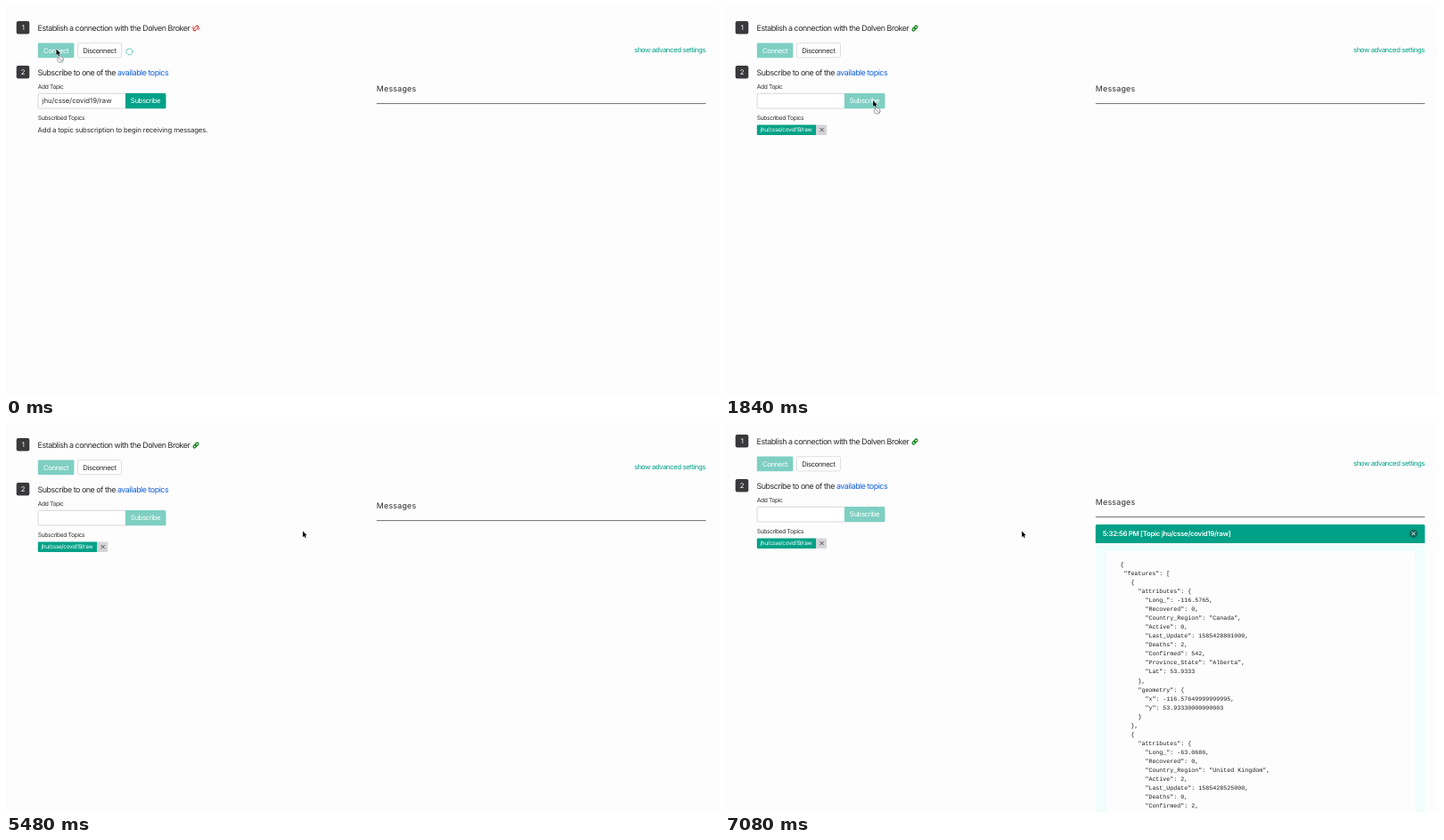
These frames come from a looping animation (800 by 437 pixels, 7120 ms). An HTML page:

```html
<!DOCTYPE html>
<html lang="en">
<head>
<meta charset="utf-8">
<title>Topic subscription demo</title>
<style>
  html, body { margin: 0; width: 100%; height: 100%; overflow: hidden; background: #fefdfe; }
  svg { display: block; width: 800px; height: 437px; }
  text { font: 7.78px Inter, sans-serif; letter-spacing: -.053em; fill: #2b2b2e; text-rendering: geometricPrecision; }
  .big { font-size: 8.89px; }
  .small { font-size: 6.67px; }
  .tag { font-size: 6.45px; }
  .mid { text-anchor: middle; }
  .white { fill: #fff; }
  .green { fill: #00a187; }
  .wide { letter-spacing: .025em; }
  .plain { letter-spacing: 0; }
  .note { letter-spacing: -.02em; }
  .head { font-weight: 600; letter-spacing: -.035em; }
  .code text { font: 6.667px "Liberation Mono", monospace; letter-spacing: 0; fill: #1c1c1f; }
  .line { fill: none; stroke-linecap: round; }
</style>
</head>
<body>
<svg viewBox="0 0 800 437">
  <g id="page">
    <rect x="11.7" y="17.1" width="14.6" height="14.4" rx="2" fill="#39383b"/>
    <text class="mid white" x="19" y="27.2">1</text>
    <text class="big" x="35.6" y="28">Establish a connection with the Dolven Broker</text>
    <g id="broken" class="line" transform="translate(213 25) rotate(-45) scale(.82)" stroke="#d8342b" stroke-width="1.5">
      <path d="M-1.2-1.6H-2.6a1.6 1.6 0 0 0 0 3.2H-1.2M1.2-1.6H2.6a1.6 1.6 0 0 1 0 3.2H1.2"/>
      <path stroke-width="1" d="M-.8-3.2V-4.4M.8 3.2V4.4M-2.6-3.2l-.7-.8M2.6 3.2l.7.8"/>
    </g>
    <g id="linked" class="line" transform="translate(213 25) rotate(-45) scale(.82)" stroke="#12831a" stroke-width="1.5">
      <rect x="-4.3" y="-1.7" width="5" height="3.4" rx="1.7"/>
      <rect x="-.7" y="-1.7" width="5" height="3.4" rx="1.7"/>
    </g>

    <rect class="green" x="35.8" y="41.4" width="40.6" height="16.8" rx="1.2" opacity=".5"/>
    <text class="mid white" x="56" y="52.6">Connect</text>
    <rect x="80.5" y="41.7" width="49" height="16.2" rx="1.5" fill="#fff" stroke="#d6d5d8" stroke-width=".8"/>
    <text class="mid" x="104.9" y="52.6">Disconnect</text>
    <circle id="spinner" r="3.5" fill="none" stroke="#00a187" stroke-dasharray="1.5 1.25"/>
    <text class="green" x="785" y="52.3" text-anchor="end">show advanced settings</text>

    <rect x="11.7" y="67.1" width="14.6" height="14.4" rx="2" fill="#39383b"/>
    <text class="mid white" x="19" y="77.2">2</text>
    <text class="big" x="35.6" y="77.6">Subscribe to one of the <tspan fill="#1260d6">available topics</tspan></text>
    <text class="small" x="35.8" y="93">Add Topic</text>
    <path d="M134 98.3H37.4a1.3 1.3 0 0 0-1.3 1.3V113.7a1.3 1.3 0 0 0 1.3 1.3H134" fill="#fff" stroke="#cfced1" stroke-width=".8"/>
    <text id="topic" class="plain" x="40.6" y="109.4">jhu/csse/covid19/raw</text>
    <path id="subscribe" class="green" d="M134 98H178a1.5 1.5 0 0 1 1.5 1.5V113.8a1.5 1.5 0 0 1-1.5 1.5H134z"/>
    <text class="mid white" x="156.5" y="109.4">Subscribe</text>
    <text class="small" x="35.8" y="128">Subscribed Topics</text>
    <text id="hint" class="note" x="35.6" y="141.8">Add a topic subscription to begin receiving messages.</text>
    <g id="chip">
      <path class="green" d="M102.3 133.5H37a1.2 1.2 0 0 0-1.2 1.2V143.8a1.2 1.2 0 0 0 1.2 1.2H102.3z"/>
      <path d="M102.3 133.5H113a1.2 1.2 0 0 1 1.2 1.2V143.8a1.2 1.2 0 0 1-1.2 1.2H102.3z" fill="#d6d4d7"/>
      <path class="line" d="M106.7 137.2l3.8 3.8m0-3.8l-3.8 3.8" stroke="#333" stroke-width=".8"/>
      <text class="tag white" x="39.6" y="141.4">jhu/csse/covid19/raw</text>
    </g>

    <text class="big wide" x="415.8" y="95.6">Messages</text>
    <rect x="415.8" y="109.1" width="369.5" height="1" fill="#6f6e71"/>
    <g id="message">
      <rect x="415.8" y="118" width="369.5" height="340" rx="1.5" fill="#effefa"/>
      <path class="green" d="M415.8 139V119.5a1.5 1.5 0 0 1 1.5-1.5H783.8a1.5 1.5 0 0 1 1.5 1.5V139z"/>
      <text class="head white" x="423.8" y="131">5:32:56 PM [Topic jhu/csse/covid19/raw]</text>
      <circle cx="772.5" cy="128.2" r="4.7" fill="#14695c"/>
      <path class="line" d="M771 126.700l3 3m0-3l-3 3" stroke="#fff" stroke-width=".9"/>
      <rect x="428" y="148" width="346" height="310" fill="#fefdfe"/>
      <g id="code" class="code"></g>
    </g>
  </g>
  <g id="cursor">
    <g id="denied" class="line" stroke="#9a9a9d" stroke-width=".9">
      <circle cx="4.5" cy="11.6" r="3.4" fill="#f4f4f5"/>
      <path d="M2.2 9.3l4.6 4.6"/>
    </g>
    <path transform="scale(.87)" d="M0 0V7.7L1.8 6.1 2.9 8.7 4.2 8.2 3.1 5.6H5.4z" stroke="#fff" stroke-width=".8" paint-order="stroke"/>
  </g>
</svg>
<script>
  const LOOP = 7120, STEP = 40;
  const CONNECTED = 320, SUBSCRIBED = 840, RECEIVED = 6520;

  const easeInOut = p => p * p * (3 - 2 * p);
  const easeOut = p => p * (2 - p);
  const easeIn = p => p * p;

  // time, x, y of the pointer, easing to the next key
  const path = [
    [0, 56.5, 48.5, easeInOut], [720, 166.2, 106.3, easeInOut], [1840, 166.2, 106.3, easeIn],
    [2360, 252.5, 121, easeOut], [2780, 333, 121.5, easeOut], [LOOP, 333, 121.5]
  ];
  // column, text
  const json = [
    [0, '{'], [1, '"features": ['], [3, '{'], [5, '"attributes": {'],
    [7, '"Long_": -116.5765,'], [7, '"Recovered": 0,'], [7, '"Country_Region": "Canada",'],
    [7, '"Active": 0,'], [7, '"Last_Update": 1585428801000,'], [7, '"Deaths": 2,'],
    [7, '"Confirmed": 542,'], [7, '"Province_State": "Alberta",'], [7, '"Lat": 53.9333'],
    [5, '},'], [5, '"geometry": {'], [7, '"x": -116.57649999999995,'],
    [7, '"y": 53.93330000000003'], [5, '}'], [3, '},'], [3, '{'], [5, '"attributes": {'],
    [7, '"Long_": -63.0686,'], [7, '"Recovered": 0,'], [7, '"Country_Region": "United Kingdom",'],
    [7, '"Active": 2,'], [7, '"Last_Update": 1585428525000,'], [7, '"Deaths": 0,'],
    [7, '"Confirmed": 2,']
  ];

  const $ = id => document.getElementById(id);
  const show = (id, on) => $(id).setAttribute('visibility', on ? 'visible' : 'hidden');
  const move = (id, x, y, turn = 0) =>
    $(id).setAttribute('transform', `translate(${x} ${y}) rotate(${turn})`);

  json.forEach(([col, line], i) => {
    const text = document.createElementNS('http://www.w3.org/2000/svg', 'text');
    text.setAttribute('x', 443.4 + col * 4);
    text.setAttribute('y', 165 + i * 10.04);
    text.textContent = line;
    $('code').append(text);
  });

  function pointerAt(t) {
    const i = path.findLastIndex(key => key[0] <= t);
    const [t0, x0, y0, ease] = path[i], [t1, x1, y1] = path[i + 1];
    const p = ease((t - t0) / (t1 - t0));
    return [x0 + (x1 - x0) * p, y0 + (y1 - y0) * p];
  }

  function draw(t) {
    const connected = t >= CONNECTED, subscribed = t >= SUBSCRIBED;
    const [x, y] = pointerAt(t);
    const overConnect = x < 76 && y < 58;
    const overSubscribe = x < 179.5 && y < 115.3 && subscribed;
    show('broken', !connected);
    show('linked', connected);
    show('spinner', !connected);
    show('topic', !subscribed);
    show('hint', !subscribed);
    show('chip', subscribed);
    show('message', t >= RECEIVED);
    show('denied', overConnect || overSubscribe);
    $('subscribe').setAttribute('opacity', subscribed ? .5 : 1);
    move('spinner', 138.5, 51.3, t * .36);
    move('cursor', x, y);
    const scroll = Math.max(0, (t - 6960) / 120);
    move('page', 0, -Math.round(4 * easeIn(scroll)));
  }

  const start = performance.now();
  function tick() {
    const t = (performance.now() - start) % LOOP;
    draw(Math.floor(t / STEP) * STEP);
    requestAnimationFrame(tick);
  }
  tick();
</script>
</body>
</html>
```
